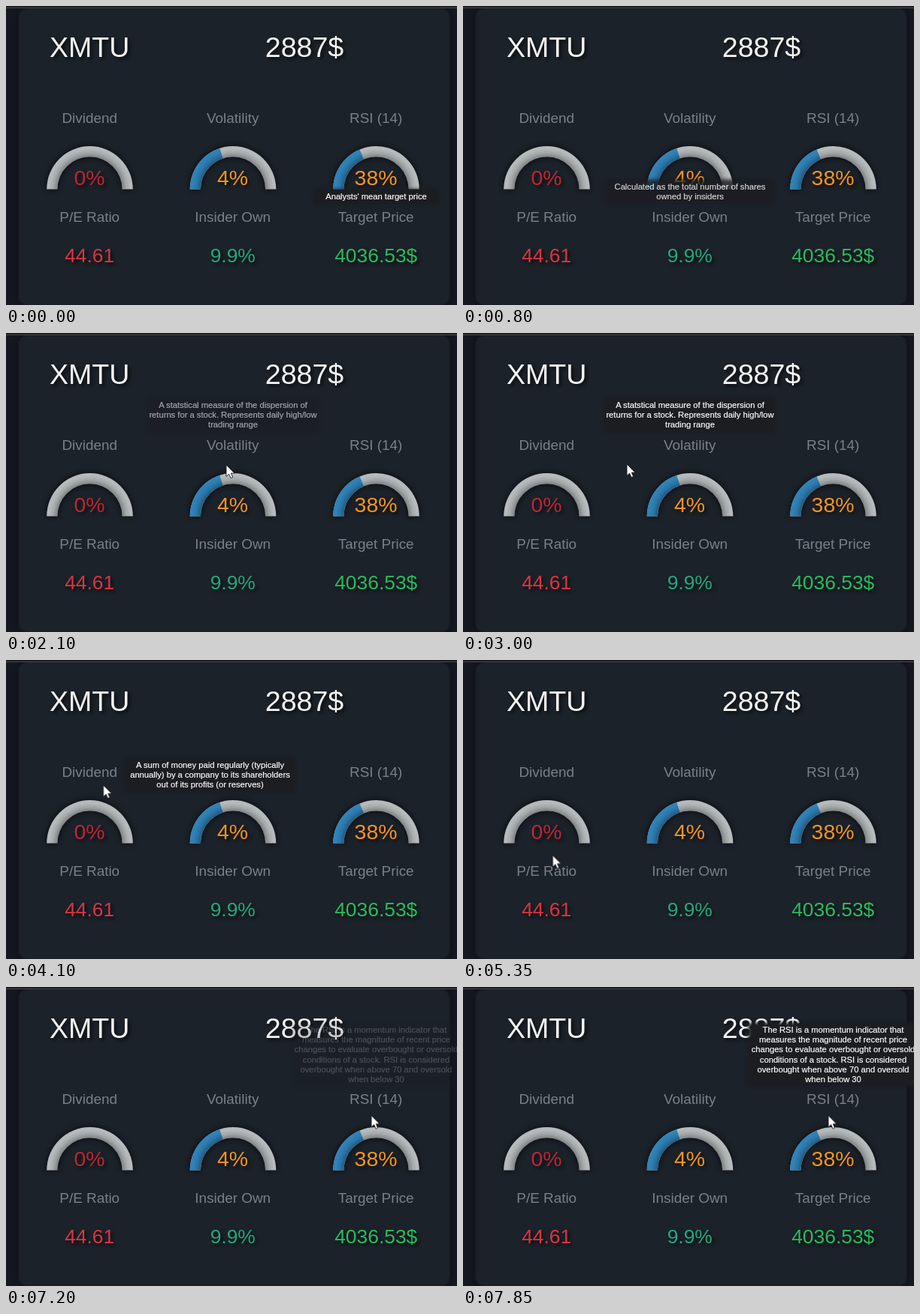
Recreate the animation shown at these times as an HTML page. Size 600 px wide and 399 px high, loop 8 s.

```html
<!DOCTYPE html>
<html lang="en">
<head>
<meta charset="utf-8">
<title>Stock summary</title>
<style>
html, body { margin: 0; width: 100%; height: 100%; overflow: hidden; background: #161821; }
svg { display: block; font-family: "Liberation Sans", Arial, sans-serif; }
.mid text, text.mid { text-anchor: middle; }
.title { font-size: 37.6px; fill: #f5f5f5; }
.label { font-size: 18.9px; fill: #7c7f87; }
.percent { font-size: 28.4px; }
.value { font-size: 26.4px; }
.title, .percent, .value { text-shadow: 3px 3px 4px rgba(0, 0, 0, .6); }
.tip { font-size: 11.2px; fill: #fff; animation: 8s linear infinite; }
.tip text { stroke: #fff; stroke-width: .2px; }
.tip rect { fill: #1b1d21; filter: blur(2px); }
#target { animation-name: target; }
#insider { animation-name: insider; }
#volatility { animation-name: volatility; }
#dividend { animation-name: dividend; }
#ratio { animation-name: ratio; }
#rsi { animation-name: rsi; }
#cursor { animation: move 8s ease-in-out infinite; }

@keyframes target { 0%, 2.5% { opacity: 1 } 6.25%, 100% { opacity: 0 } }
@keyframes insider { 0%, 4.4% { opacity: 0 } 11.3%, 23.1% { opacity: 1 } 25.6%, 100% { opacity: 0 } }
@keyframes volatility { 0%, 24.4% { opacity: 0 } 27.5%, 38.1% { opacity: 1 } 41.9%, 100% { opacity: 0 } }
@keyframes dividend { 0%, 43.1% { opacity: 0 } 50.6%, 60.6% { opacity: 1 } 64.4%, 100% { opacity: 0 } }
@keyframes ratio { 0%, 68.1% { opacity: 0 } 76.2%, 80.6% { opacity: 1 } 85%, 100% { opacity: 0 } }
@keyframes rsi { 0%, 88.1% { opacity: 0 } 97.5%, 100% { opacity: 1 } }
@keyframes move {
  0%, 23.1% { transform: translate(300px, 250px); opacity: 0 }
  23.2% { transform: translate(300px, 250px); opacity: 1 }
  26%, 30% { transform: translate(293px, 176px) }
  37.5% { transform: translate(218px, 175px) }
  46%, 60% { transform: translate(129.5px, 167px) }
  69%, 80% { transform: translate(118px, 272.5px) }
  89%, 100% { transform: translate(486px, 171.5px); opacity: 1 }
}
</style>
</head>
<body>
<svg width="600" height="399" viewBox="0 0 600 399">
  <defs>
    <linearGradient id="card">
      <stop offset="0" stop-color="#1e202b"/>
      <stop offset=".2" stop-color="#1c202b"/>
      <stop offset=".8" stop-color="#1c202b"/>
      <stop offset="1" stop-color="#1d202b"/>
    </linearGradient>
    <radialGradient id="shade" gradientUnits="userSpaceOnUse" cx="0" cy="0" r="57.3">
      <stop offset=".75" stop-color="#000" stop-opacity=".3"/>
      <stop offset=".85" stop-color="#000" stop-opacity=".1"/>
      <stop offset=".94" stop-color="#000" stop-opacity="0"/>
    </radialGradient>
    <filter id="soft" x="-20%" y="-20%" width="140%" height="140%">
      <feGaussianBlur stdDeviation="4"/>
    </filter>
    <filter id="edge" x="-5%" y="-5%" width="110%" height="110%">
      <feGaussianBlur stdDeviation="1.2"/>
    </filter>
  </defs>

  <rect width="600" height="399" fill="#161821"/>
  <rect x="15" y="3" width="577" height="398" rx="12" fill="#0d0f16" opacity=".5" filter="url(#soft)"/>
  <rect x="17" y="3" width="573" height="396" rx="12" fill="url(#card)" filter="url(#edge)"/>
  <rect width="600" height="2" fill="#1b1b1e"/>
  <rect y="2" width="600" height="1" fill="#4b4a4a"/>

  <text class="title" x="58" y="67.5">XMTU</text>
  <text class="title mid" x="397" y="67.5">2887$</text>
  <g id="columns" class="mid"></g>
  <g id="tips" class="mid"></g>
  <path id="cursor" d="M0 0V15.5L3.6 12.2L6 17.6L8.6 16.4L6.3 11.2H11Z"
        fill="#fff" stroke="#15161c" stroke-width=".9"/>
</svg>
<script>
const R = 57.3, BAND = 14.2;

// Half-ring sector, measured in degrees from its left end
function arc(deg, fill) {
  const a = deg * Math.PI / 180, r = R - BAND;
  const at = q => `${-q * Math.cos(a)} ${-q * Math.sin(a)}`;
  return `<path fill="${fill}" d="M${-R} 0A${R} ${R} 0 0 1 ${at(R)}L${at(r)}A${r} ${r} 0 0 0 ${-r} 0Z"/>`;
}

const columns = [
  { x: 111.5, name: 'Dividend', pct: '0%', pctFill: '#bd2632', deg: 0,
    stat: 'P/E Ratio', value: '44.61', fill: '#dc3440' },
  { x: 302, name: 'Volatility', pct: '4%', pctFill: '#f6951e', deg: 72,
    stat: 'Insider Own', value: '9.9%', fill: '#24a87c' },
  { x: 492.5, name: 'RSI (14)', pct: '38%', pctFill: '#f6951e', deg: 67.5,
    stat: 'Target Price', value: '4036.53$', fill: '#29bb5c' }
];

document.getElementById('columns').innerHTML = columns.map(c => `
  <g transform="translate(${c.x} 0)">
    <text class="label" x="-.3" y="156">${c.name}</text>
    <g transform="translate(0 244.4)">
      <g filter="url(#soft)" opacity=".75">${arc(180, '#05070b')}</g>
      ${arc(180, '#b5babc')}${c.deg ? arc(c.deg, '#2f82b8') : ''}${arc(180, 'url(#shade)')}
    </g>
    <text class="percent" x="-.5" y="239" fill="${c.pctFill}">${c.pct}</text>
    <text class="label" x="-.3" y="288.3">${c.stat}</text>
    <text class="value" x="-.3" y="342.3" fill="${c.fill}">${c.value}</text>
  </g>`).join('');

const tips = [
  { id: 'target', x: 492.5, y: 258, w: 166, lines: ["Analysts' mean target price"] },
  { id: 'insider', x: 302, y: 245, w: 226,
    lines: ['Calculated as the total number of shares', 'owned by insiders'] },
  { id: 'volatility', x: 302, y: 100, w: 226,
    lines: ['A statstical measure of the dispersion of',
      'returns for a stock. Represents daily high/low', 'trading range'] },
  { id: 'dividend', x: 271.5, y: 144, w: 226,
    lines: ['A sum of money paid regularly (typically',
      'annually) by a company to its shareholders', 'out of its profits (or reserves)'] },
  { id: 'ratio', x: 271.5, y: 276, w: 226,
    lines: ['The P/E ratio is the ratio for valuing a',
      'company that measures its current share', 'price relative to its earnings per share'] },
  { id: 'rsi', x: 492.5, y: 61, w: 226,
    lines: ['The RSI is a momentum indicator that', 'measures the magnitude of recent price',
      'changes to evaluate overbought or oversold', 'conditions of a stock. RSI is considered',
      'overbought when above 70 and oversold', 'when below 30'] }
];
const LINE = 13.2;

document.getElementById('tips').innerHTML = tips.map(t => `
  <g class="tip" id="${t.id}">
    <rect x="${t.x - t.w / 2}" y="${t.y - 13.5}" width="${t.w}" height="${t.lines.length * LINE + 7}" rx="4"/>
    ${t.lines.map((s, i) => `<text x="${t.x}" y="${t.y + i * LINE}">${s}</text>`).join('')}
  </g>`).join('');
</script>
</body>
</html>
```
